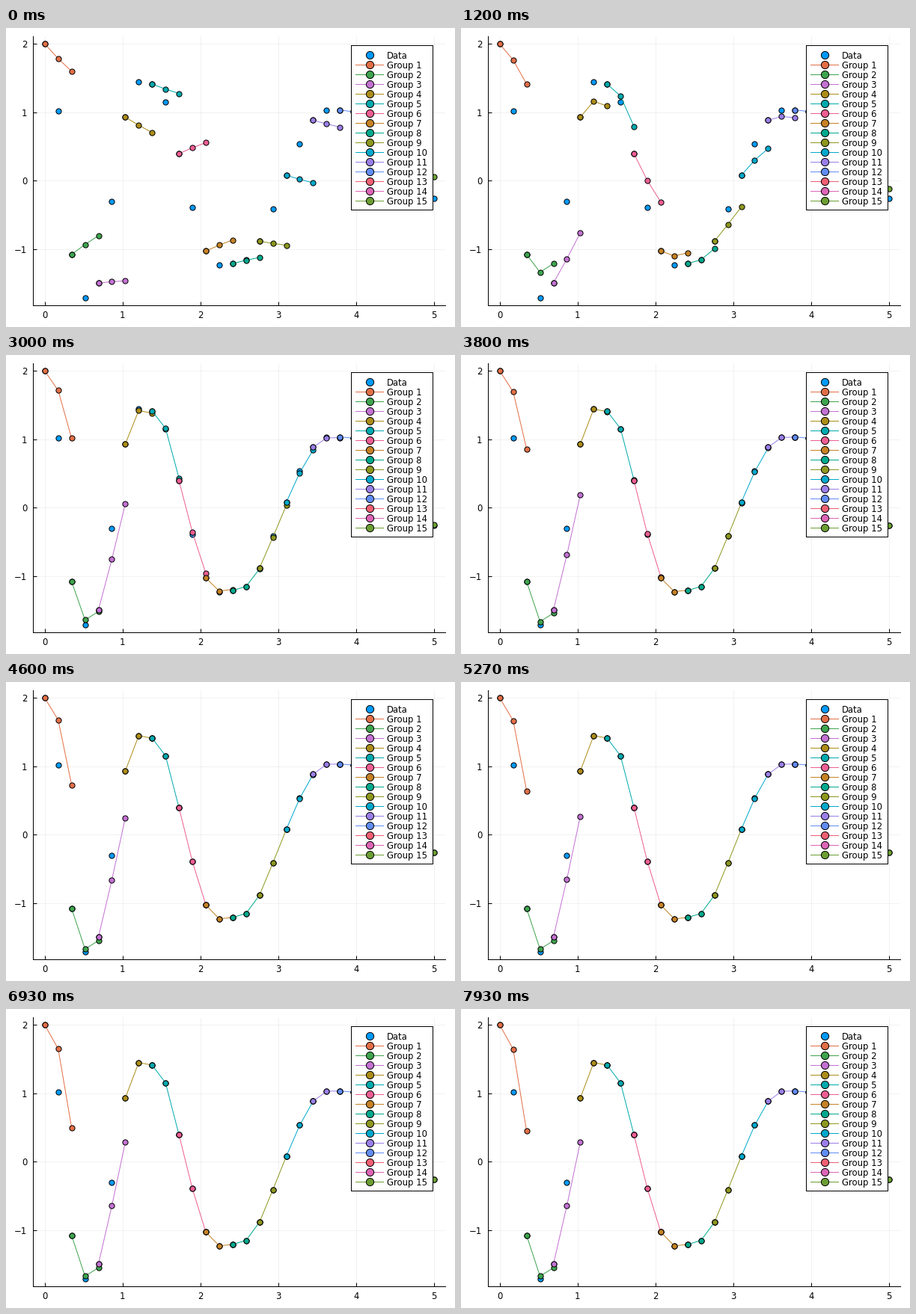
A matplotlib script for the animation above (8 s loop, 600x400 px).

```python
import numpy as np
import matplotlib.pyplot as plt
from matplotlib.animation import FuncAnimation

FRAMES, LOOP_MS = 120, 8000
PX = 0.72  # points per pixel at 100 dpi
FONT = 11.6 * PX

COLORS = ["#009AFA", "#E36F47", "#3EA44E", "#C371D2", "#AC8D18", "#00AAAE",
          "#ED5E93", "#C68225", "#00A98D", "#8E971E", "#00A9CC", "#9B7FE9",
          "#618DF6", "#F06073", "#DD65B6", "#6C9F33"]

# Where the three steepest groups end up; all others reach the data.
STEEP = {1: (1.645, 0.445), 2: (-1.672, -1.55), 3: (-0.643, 0.285)}

plt.rcParams["font.family"] = "DejaVu Sans"


def spiral(n=30, t_end=5.0, sub=60):
    """States of a damped cubic oscillator, integrated with RK4."""
    def rate(u):
        a, b = u ** 3
        return np.array([-0.1 * a - 2 * b, 2 * a - 0.1 * b])

    u, h = np.array([2.0, 0.0]), t_end / (n - 1) / sub
    out = [u]
    for _ in range(n - 1):
        for _ in range(sub):
            k1 = rate(u)
            k2 = rate(u + h / 2 * k1)
            k3 = rate(u + h / 2 * k2)
            k4 = rate(u + h * k3)
            u = u + h / 6 * (k1 + 2 * k2 + 2 * k3 + k4)
        out.append(u)
    return np.array(out).T


t = np.linspace(0, 5, 30)
data, hidden = spiral()


def untrained(idx):
    """Gentle drift away from the group's first state."""
    u, v = data[idx[0]], hidden[idx[0]]
    drift = -0.05 * u ** 3 + 0.22 * np.tanh(v ** 3 / 2.5)
    return u + drift * np.array([0, 0.53, 1])[:len(idx)]


def trained(k, idx):
    ys = data[idx].copy()
    if k in STEEP:
        ys[1:] = STEEP[k]
    return ys


def progress(gap):
    """Training curve from 0 to 1; groups that fit worse learn slower."""
    tau = 21 + 17 * gap ** 2
    w = 1 - np.exp(-(np.arange(FRAMES) / tau) ** 1.5)
    return w / w[-1]


def group_path(k):
    """Indices of group k and its heights in every frame."""
    idx = np.arange(2 * k - 2, min(2 * k + 1, len(t)))
    first, last = untrained(idx), trained(k, idx)
    w = progress(np.abs(last - data[idx]).max())
    return idx, first + w[:, None] * (last - first)


def series(ax, x, y, color, size, z, ls="-"):
    return ax.plot(x, y, ls=ls, marker="o", color=color, lw=PX,
                   ms=size * PX, mec="black", mew=PX, zorder=z)[0]


def px_axes(fig, left, top, right, bottom):
    return fig.add_axes([left / 600, 1 - bottom / 400,
                         (right - left) / 600, (bottom - top) / 400])


fig = plt.figure(figsize=(6, 4), dpi=100, facecolor="white")

ax = px_axes(fig, 36.2, 11.4, 587.4, 370.9)
ax.set_xlim(-0.15, 5.15)
ax.set_ylim(-166.5 / 91.5, 193 / 91.5)
ax.set_xticks(range(6))
ax.set_yticks([-1, 0, 1, 2], ["\u22121", "0", "1", "2"])
ax.tick_params(direction="in", length=5 * PX, width=PX, labelsize=FONT)
ax.tick_params(axis="x", pad=7 * PX)
ax.tick_params(axis="y", pad=8 * PX)
ax.grid(color="black", alpha=0.1, lw=0.5 * PX)
ax.set_axisbelow(True)
ax.spines[["top", "right"]].set_visible(False)
ax.spines[["left", "bottom"]].set_linewidth(PX)

series(ax, t, data, COLORS[0], 7.2, 3, ls="none")
groups = []
for k in range(1, 16):
    idx, ys = group_path(k)
    groups.append((series(ax, t[idx], ys[0], COLORS[k], 7.2, 3 + k), ys))

key = px_axes(fig, 461, 23.4, 570, 243.4)
key.set_xlim(461, 570)
key.set_ylim(243.4, 23.4)
key.set_xticks([])
key.set_yticks([])
key.set_zorder(5)
for spine in key.spines.values():
    spine.set_linewidth(PX)
for k, color in enumerate(COLORS):
    y = 36.4 + 12.97 * k
    if k:
        key.plot([467, 504], [y, y], color=color, lw=PX)
    series(key, [485.5], [y], color, 10.2, 3, ls="none")
    key.text(509.2, y, f"Group {k}" if k else "Data", fontsize=FONT,
             va="center_baseline")


def draw(frame):
    for line, ys in groups:
        line.set_ydata(ys[frame])
    return [line for line, _ in groups]


anim = FuncAnimation(fig, draw, frames=FRAMES, interval=LOOP_MS / FRAMES,
                     repeat=True, repeat_delay=0, blit=False)
plt.show()
```
